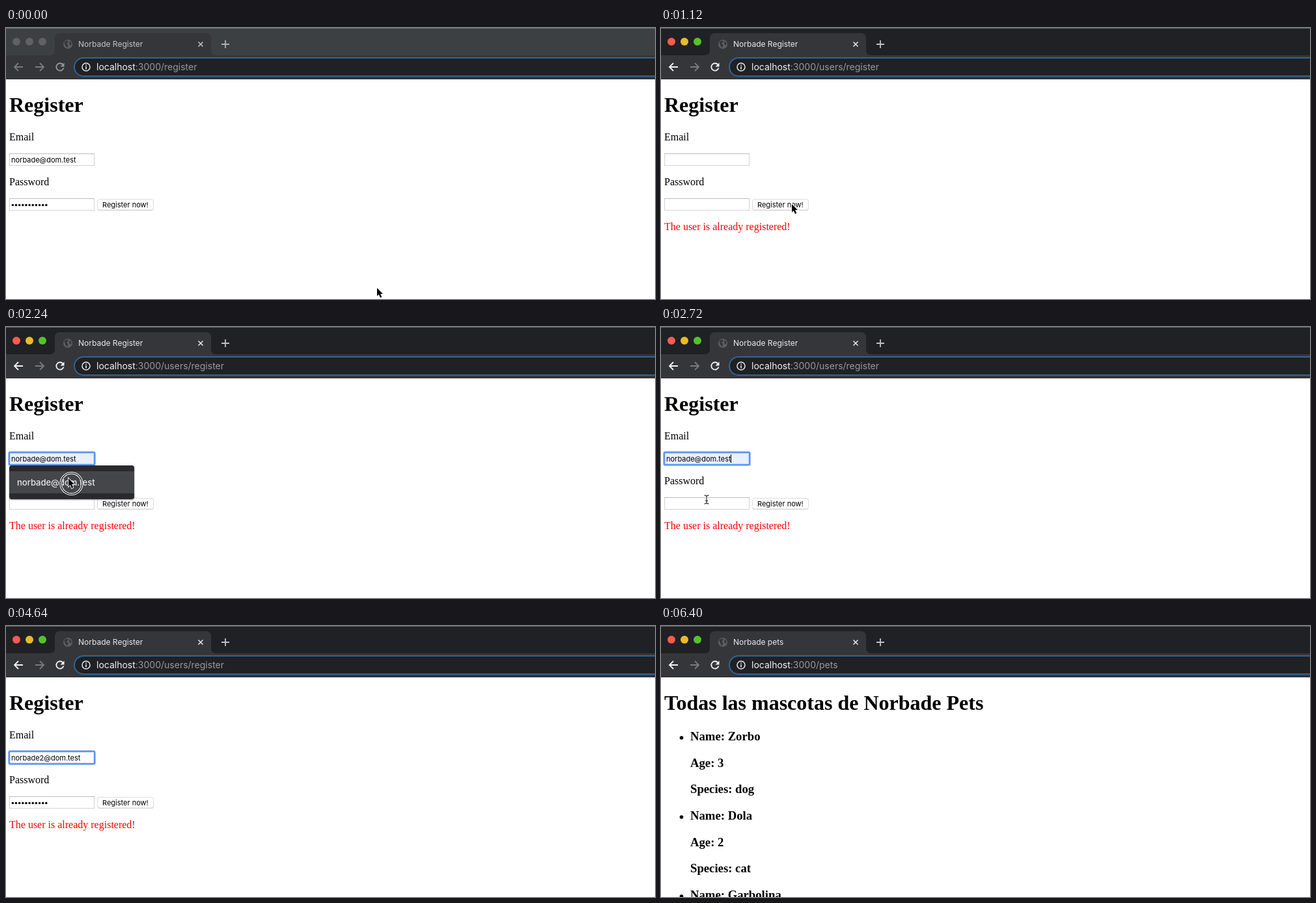
An HTML page for the animation above (7.04 s loop, 997x417 px).

```html
<!DOCTYPE html>
<html lang="en">
<head>
<meta charset="utf-8">
<title>Register flow</title>
<style>
  html, body { margin: 0; width: 100%; height: 100%; overflow: hidden; background: #fff; }
  svg { display: block; }
  text { white-space: pre; }
  .ui { font-family: Inter, sans-serif; }
  .page { font-family: "Liberation Serif", serif; }
</style>
</head>
<body>
<svg id="stage" width="997" height="417" viewBox="0 0 997 417"></svg>
<script>
const LOOP = 7040;
const EMAIL = 'norbade@dom.test';
const EMAIL_2 = 'norbade2@dom.test';

const arrow = (x, y) => ({ cursor: { kind: 'arrow', x, y } });
const beam = (x, y) => ({ cursor: { kind: 'beam', x, y } });

// Each step overrides part of the state and holds until the next one.
const steps = [
  [0, { page: 'form', path: '/register', title: 'Norbade Register', active: false, back: false,
        loading: false, error: false, email: EMAIL, autofill: false, dots: 11, focus: '',
        caret: false, menu: false, hover: false, pressed: false, ring: false, ...arrow(570, 400) }],
  [160, arrow(452, 362)],
  [320, { active: true, ...arrow(268, 296) }],
  [480, arrow(207, 271)],
  [640, arrow(201, 271)],
  [800, { pressed: true, ring: true }],
  [960, { pressed: false, ring: false, loading: true, path: '/users/register', back: true }],
  [1120, { loading: false, error: true, email: '', dots: 0 }],

  [1440, arrow(160, 243)],
  [1600, beam(103, 207)],
  [1760, { focus: 'email', caret: true, menu: true, ring: true }],
  [1920, { ring: false }],
  [2080, { hover: true, email: EMAIL, autofill: true, caret: false, ...arrow(96, 233) }],
  [2240, { ring: true }],
  [2400, { ring: false, menu: false, hover: false, caret: true }],

  [2560, arrow(84, 244)],
  [2720, beam(70, 265.5)],
  [2880, { ring: true, focus: 'password' }],
  [3040, { caret: true }],
  [3200, { ring: false }],

  [3520, { dots: 5, cursor: null }],
  [3680, { dots: 11 }],
  [3840, { caret: false, ...beam(145, 57) }],
  [4000, beam(52, 209)],
  [4160, { ring: true, focus: 'email' }],
  [4320, { ring: false, caret: true }],
  [4480, { email: EMAIL_2, autofill: false, cursor: null }],

  [4640, { caret: false }],
  [4800, beam(75, 208)],
  [4960, arrow(150, 246)],
  [5120, arrow(206, 270)],
  [5280, { pressed: true, ring: true, focus: '' }],
  [5600, { pressed: false, ring: false, loading: true, path: '/pets' }],
  [5760, { loading: false, page: 'pets', title: 'Norbade pets' }],

  [6080, beam(123, 251)],
  [6240, beam(492, 121)],
  [6400, { cursor: null }],
];

const text = (x, y, size, content, fill = '#000', cls = 'ui', weight = 400) =>
  `<text class="${cls}" x="${x}" y="${y}" font-size="${size}" fill="${fill}" font-weight="${weight}">${content}</text>`;
const serif = (x, y, size, content, weight = 400, fill = '#000') =>
  text(x, y, size, content, fill, 'page', weight);
const rect = (x, y, w, h, fill, extra = '') =>
  `<rect x="${x}" y="${y}" width="${w}" height="${h}" fill="${fill}" ${extra}/>`;
const circle = (x, y, r, fill, extra = '') =>
  `<circle cx="${x}" cy="${y}" r="${r}" fill="${fill}" ${extra}/>`;
const line = (d, color, width = 1.6) =>
  `<path d="${d}" fill="none" stroke="${color}" stroke-width="${width}"/>`;

function browser(s) {
  const strip = s.active ? '#202124' : '#3c4043';
  const bright = s.active ? '#e8eaed' : '#c3c5c8';
  const dim = '#797b7f';
  const lights = s.active ? ['#fc5b50', '#e9bb27', '#54c22b'] : Array(3).fill('#5f6164');
  const reloadColor = s.active ? '#f1f3f4' : '#96989b';
  const favicon = s.loading
    ? line('M95 18A7 7 0 1 1 88 25', '#9aa0a6', 2)
    : circle(95, 25, 7, '#5b5e62') +
      '<path d="M89.5 21.5L94 19L96 21L93 24L95.500 26L94 30.500L91 27Z M97.500 20L100.500 23L100 27L97 25Z" fill="#35363a"/>';
  const reload = s.loading
    ? line('M78 55L88 65M88 55L78 65', reloadColor, 1.8)
    : line('M87.300 56.200A5.700 5.700 0 1 0 88.500 61.500', reloadColor, 1.8) +
      `<path d="M89.500 53.500V59.500H83.500Z" fill="${reloadColor}"/>`;

  return rect(0, 0, 997, 42, strip) +
    rect(0, 0, 997, 1, s.active ? '#626366' : '#707275') +
    rect(0, 42, 997, 37, '#35363a') +
    rect(0, 78, 997, 1, '#28292c') +
    lights.map((color, i) => circle(16 + 20 * i, 21, 6, color)).join('') +
    '<path d="M67 42Q75 42 75 34V16Q75 8 83 8H307Q315 8 315 16V34Q315 42 323 42Z" fill="#35363a"/>' +
    favicon +
    text(111, 29, 12, s.title, bright) +
    line('M295.500 21.500L302.500 28.500M302.500 21.500L295.500 28.500', bright, 1.5) +
    line('M331 25H343M337 19V31', s.active ? '#bdc1c6' : '#aeb1b5', 1.8) +
    line('M26 60H13M19 54L13 60L19 66', s.back ? '#f1f3f4' : dim, 1.8) +
    line('M45 60H58M52 54L58 60L52 66', dim, 1.8) +
    reload +
    rect(105, 46, 920, 28, '#202124', 'rx="14" stroke="#2d659b" stroke-width="2"') +
    circle(123, 60, 6, 'none', 'stroke="#e8eaed" stroke-width="1.5"') +
    rect(122.2, 59, 1.6, 4.5, '#e8eaed') + rect(122.2, 56.3, 1.6, 1.6, '#e8eaed') +
    text(139, 65, 14, `localhost<tspan fill="#969ba1">:3000${s.path}</tspan>`, '#f1f3f4');
}

function field(y, focused, autofill) {
  const fill = autofill ? '#e8f0fe' : '#fff';
  if (focused) {
    return rect(3.5, y - 1.5, 134, 22, 'none', 'rx="3" stroke="#b9d2fa"') +
      rect(5, y, 131, 19, fill, 'rx="1" stroke="#5c95f2" stroke-width="2.500"');
  }
  return rect(5.5, y + .5, 130, 18, fill, `stroke="${autofill ? '#b4b7bd' : '#d2d2d2'}"`) +
    rect(5, y, 131, 1, autofill ? '#858585' : '#bebebe');
}

function button(pressed) {
  return rect(140.5, 264, 86, 17, '#ccc', 'rx="3.500"') +
    rect(140.5, 263.5, 86, 16.5, pressed ? 'url(#press)' : '#fff',
      `rx="3.500" stroke="${pressed ? '#2f74e8' : '#dcdcdc'}"`) +
    text(148, 276, 11, 'Register now!', pressed ? '#0b1d3c' : '#000');
}

function form(s) {
  const dots = Array.from({ length: s.dots }, (_, i) => circle(10.3 + 5.15 * i, 272.5, 1.75, '#000')).join('');
  const emailWidth = { '': 0, [EMAIL]: 99, [EMAIL_2]: 106 }[s.email];
  const caret = !s.caret ? ''
    : s.focus === 'email' ? rect(8 + emailWidth, 196, 1, 13, '#000')
    : rect(8 + 5.15 * s.dots, 265, 1, 13, '#000');
  const menu = s.menu
    ? rect(5, 213, 192, 52, '#292a2d', 'rx="4" filter="url(#shadow)"') +
      (s.hover ? rect(5, 222, 192, 34, '#45464a') : '') +
      text(17, 244, 13, EMAIL, '#e8eaed', 'ui', 500)
    : '';
  return serif(5, 129, 32, 'Register', 700) +
    serif(5, 173, 16, 'Email') +
    field(193, s.focus === 'email', s.autofill) +
    text(8, 207, 11, s.email) +
    serif(5, 242, 16, 'Password') +
    field(262, s.focus === 'password', false) +
    dots + caret + button(s.pressed) +
    (s.error ? serif(5, 311, 16, 'The user is already registered!', 400, '#f00') : '') +
    menu;
}

function pets() {
  const list = [['Zorbo', 3, 'dog'], ['Dola', 2, 'cat'], ['Garbolina', 5, 'cat']];
  return serif(5, 129, 32, 'Todas las mascotas de Norbade Pets', 700) +
    list.map(([name, age, species], i) => {
      const y = 176 + 122 * i;
      return circle(31.5, y - 4, 2.8, '#000') +
        [`Name: ${name}`, `Age: ${age}`, `Species: ${species}`]
          .map((label, row) => serif(45, y + Math.round(40.6 * row), 18.72, label, 700)).join('');
    }).join('');
}

function pointer({ cursor, ring }) {
  if (!cursor) return '';
  const { kind, x, y } = cursor;
  const isArrow = kind === 'arrow';
  const cx = isArrow ? x + 4.5 : x;
  const cy = isArrow ? y + 8 : y;
  const beamPath = 'M-3.500 -6.500Q0 -6.500 0 -4.500Q0 -6.500 3.500 -6.500M0 -5V5M-3.500 6.500Q0 6.500 0 4.500Q0 6.500 3.500 6.500M-2 2H2';
  const shape = isArrow
    ? '<path d="M0 0V12.500L2.800 9.900L5 15L7.300 14L5.100 9.100H9Z" fill="#000" stroke="#fff" stroke-width="1.800" paint-order="stroke"/>'
    : line(beamPath, '#fff', 3) + line(beamPath, '#444', 1.3);
  const halo = ring
    ? circle(cx, cy, 16.3, 'none', 'stroke="#fff" stroke-width="3.500"') +
      circle(cx, cy, 16.3, 'none', 'stroke="#111" stroke-width="1.300"')
    : '';
  return `${halo}<g transform="translate(${x} ${y})">${shape}</g>`;
}

const defs = `<defs>
  <linearGradient id="press" x2="0" y2="1"><stop stop-color="#589dfa"/><stop offset="1" stop-color="#0d5ef0"/></linearGradient>
  <filter id="shadow" x="-10%" y="-20%" width="120%" height="150%"><feDropShadow dx="0" dy="1" stdDeviation="1" flood-opacity=".4"/></filter>
</defs>`;

const stage = document.getElementById('stage');
let shown = 0;

function draw() {
  const t = performance.now() % LOOP;
  const passed = steps.filter(([start]) => start <= t);
  if (passed.length !== shown) {
    shown = passed.length;
    const state = Object.assign({}, ...passed.map(([, change]) => change));
    stage.innerHTML = defs + rect(0, 0, 997, 417, '#fff') + browser(state) +
      (state.page === 'form' ? form(state) : pets()) + pointer(state);
  }
  requestAnimationFrame(draw);
}
draw();
</script>
</body>
</html>
```
